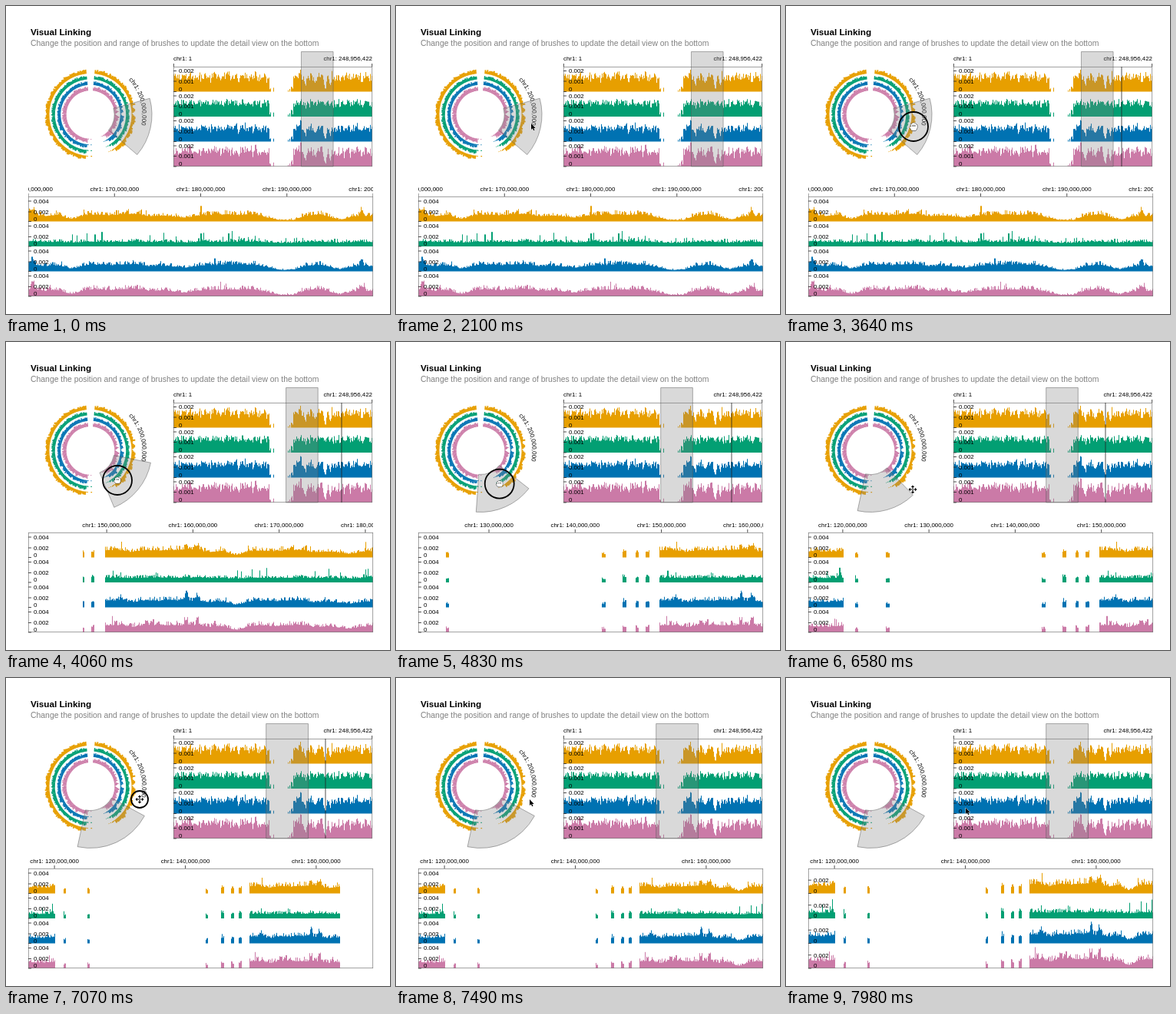
These frames come from a looping animation (500x401 px, 8 s). An HTML page with a canvas:

```html
<!DOCTYPE html>
<html lang="en">
<head>
<meta charset="utf-8">
<title>Visual Linking</title>
<style>
html, body { margin: 0; width: 100%; height: 100%; overflow: hidden; background: #fff; }
canvas { display: block; }
</style>
</head>
<body>
<canvas id="stage" width="500" height="401"></canvas>
<script>
const ctx = document.getElementById('stage').getContext('2d');
const LOOP = 8000, STEP = 70, TOTAL = 248.956422, ROW = 32.5;
const FONT = '"Liberation Sans", Arial, sans-serif';
const OVER = { x: 218, y: 79, w: 259 }, DETAIL = { x: 29, y: 248, w: 449 };
const PER_MB = OVER.w / TOTAL;
const CX = 110, CY = 141.5;
// flat: how far the common profile is levelled out, spike: size of rare tall bars
const TRACKS = [
  { color: '#E79F00', flat: 0, spike: .7, over: 2 },
  { color: '#029F73', flat: .8, spike: 1.3, over: 2.6 },
  { color: '#0072B2', flat: .1, spike: .4, over: 1.9 },
  { color: '#CB7AA7', flat: 0, spike: .8, over: 2.05 }
];

const DIPS = [[165, 1.3, 6], [178.3, 1.2, 5], [190, 2.4, 8], [196.2, 1.2, 8]]; // centre, width, depth
const PEAKS = [89.4, 159.2, 160.5, 198.65];
const ISLANDS = [121.6, 125.2, 143.3, 145.7, 147.2, 148.4];
const inGap = m => m > 120.1 && m < 149.8;

// Moves of the pointer: begin, end, then the place it arrives at
const MOVES = [
  [840, 2100, 176, 153], [2310, 2520, 158, 114], [2940, 3080, 166, 157], [3640, 4060, 145, 180],
  [4270, 5250, 127, 188], [5530, 6160, 176, 146], [6160, 6580, 165, 192], [6720, 7070, 174, 158],
  [7490, 7980, 234, 169]
];

const ramp = (t, from, to) => Math.min(1, Math.max(0, (t - from) / (to - from)));
const bell = (m, centre, width) => Math.exp(-(((m - centre) / width) ** 2));

function brushAt(t) {
  const start = 160 - 38.2 * ramp(t, 3640, 4480) - 5.8 * ramp(t, 4830, 5250);
  return [start, start + 40 + 12.7 * ramp(t, 6720, 7070)];
}

function pointerAt(t) {
  return MOVES.reduce(([x, y], [from, to, toX, toY]) => {
    const p = ramp(t, from, to);
    return [x + (toX - x) * p, y + (toY - y) * p];
  }, [260, 401]);
}

function rand(n, k) {
  const s = Math.sin(n * 12.9898 + k * 78.233) * 43758.5453;
  return s - Math.floor(s);
}

function smooth(v, k) {
  const i = Math.floor(v), p = v - i;
  return rand(i, k) * (1 - p) + rand(i + 1, k) * p;
}

function level(m, track) {
  if (inGap(m)) {
    const i = ISLANDS.findIndex(c => Math.abs(m - c) < .18);
    return i < 0 ? 0 : 4 + 6 * rand(i, 3);
  }
  let h = 9 + 4 * smooth(m / 1.5, 9);
  for (const [c, w, depth] of DIPS) h -= depth * bell(m, c, w);
  for (const c of PEAKS) h += 9 * bell(m, c, .2);
  return Math.max(2.5, h + (7 - h) * track.flat);
}

const fine = TRACKS.map((tr, k) => Array.from({ length: 2490 }, (_, i) => {
  const burst = rand(i, k + 20) > .92 ? 1 + tr.spike * rand(i, k + 30) : 1;
  return level(i / 10 + .05, tr) * (.75 + .5 * rand(i, k + 1) ** 2) * burst;
}));

const coarse = TRACKS.map((tr, k) => Array.from({ length: 249 }, (_, i) => {
  let sum = 0;
  for (let s = .1; s < 1; s += .2) sum += level(i + s, tr);
  const notch = rand(i, 50) > .88 ? .75 : 1;
  return Math.min(31.5, sum / 5 * tr.over * notch * (.72 + .38 * rand(i, k + 40)));
}));

function text(s, x, y, size = 7.9, align = 'left', color = '#000', weight = '') {
  ctx.font = `${weight} ${size}px ${FONT}`;
  ctx.textAlign = align;
  ctx.fillStyle = color;
  ctx.fillText(s, x, y);
}

function line(x1, y1, x2, y2, color = '#222', width = .8) {
  ctx.strokeStyle = color;
  ctx.lineWidth = width;
  ctx.beginPath();
  ctx.moveTo(x1, y1);
  ctx.lineTo(x2, y2);
  ctx.stroke();
}

// One bar per pixel column; height(k, x) gives the bar of row k
function rows(p, height) {
  TRACKS.forEach((tr, k) => {
    ctx.fillStyle = tr.color;
    const base = p.y + ROW * (k + 1);
    for (let x = 0; x < p.w; x++) {
      const h = height(k, x + .5);
      if (h) ctx.fillRect(p.x + x, base - h, 1, h);
    }
  });
  ctx.strokeStyle = '#777';
  ctx.lineWidth = .7;
  ctx.strokeRect(p.x + .3, p.y + .3, p.w - .6, ROW * 4 - .6);
}

// Vertical scale of every row; labels are [text, distance above the base]
function scale(p, labels) {
  for (let k = 1; k <= 4; k++) {
    const base = p.y + ROW * k;
    for (const [s, up] of labels) {
      line(p.x, base - up, p.x + 4, base - up);
      text(s, p.x + 7, base - Math.max(up, 3.5) + 2.8);
    }
  }
}

function overview() {
  rows(OVER, (k, x) => coarse[k][Math.floor(x / PER_MB)]);
  scale(OVER, [['0.002', 27], ['0.001', 13.5], ['0', 0]]);
  line(218.4, 75, 218.4, 79);
  line(476.6, 75, 476.6, 79);
  text('chr1: 1', 218, 71);
  text('chr1: 248,956,422', 477, 71, 7.9, 'right');
}

const angle = m => (264.6 - m * 1.4) * Math.PI / 180;

function wedge(r1, r2, a, b) {
  ctx.beginPath();
  ctx.arc(CX, CY, r2, a, b);
  ctx.arc(CX, CY, r1, b, a, true);
  ctx.closePath();
}

function circle() {
  coarse.forEach((bars, k) => {
    ctx.fillStyle = TRACKS[k].color;
    const r = 53.6 - k * 7.4;
    bars.forEach((h, i) => {
      if (h < .5) return;
      wedge(r, r + h * .235, angle(i + 1.3), angle(i));
      ctx.fill();
    });
  });
  const label = 'chr1: 200,000,000', r = 67.5;
  ctx.font = `7.9px ${FONT}`;
  let a = angle(200) - ctx.measureText(label).width / 2 / r;
  for (const c of label) {
    const w = ctx.measureText(c).width / r;
    ctx.save();
    ctx.translate(CX, CY);
    ctx.rotate(a + w / 2 + Math.PI / 2);
    text(c, 0, -r, 7.9, 'center');
    ctx.restore();
    a += w;
  }
}

function detail(t, start, end) {
  const w = DETAIL.w / (end - start), toX = m => DETAIL.x + (m - start) * w;
  const [readyFrom, readyTo] = brushAt(t - 140); // data arrives a little late
  const zoomed = t >= 7560;
  rows(DETAIL, (k, x) => {
    const m = start + x / w;
    if (m < readyFrom || m > readyTo) return 0;
    return Math.min(31, fine[k][Math.floor(m * 10)] * (zoomed ? 1.3 : 1));
  });
  ctx.save();
  ctx.beginPath();
  ctx.rect(DETAIL.x, 228, DETAIL.w, 21);
  ctx.clip();
  const step = end - start > 42.4 ? 20 : 10;
  for (let m = Math.ceil((start - .01) / step) * step; m <= end + .01; m += step) {
    line(toX(m), 244, toX(m), 248);
    text(`chr1: ${m},000,000`, toX(m), 241, 7.9, 'center');
  }
  ctx.restore();
  scale(DETAIL, zoomed ? [['0.002', 17.3], ['0', 0]] : [['0.004', 26.5], ['0.002', 12.5], ['0', 0]]);
  return toX;
}

function brushes(start, end) {
  const paint = () => { ctx.fill(); ctx.stroke(); };
  ctx.fillStyle = 'rgba(128,128,128,.3)';
  ctx.strokeStyle = 'rgba(90,90,90,.7)';
  ctx.lineWidth = .7;
  ctx.beginPath();
  ctx.rect(OVER.x + start * PER_MB, 59.5, (end - start) * PER_MB, 149.5);
  paint();
  wedge(31, 80, angle(end), angle(start));
  paint();
}

// Position under the pointer, held while the brush takes the mouse
function hovered(t, x, y) {
  if (t >= 840 && t < 2100 && y > DETAIL.y && y < 378) return 160 + (x - DETAIL.x) / 11.23;
  if (t >= 2450 && t < 5250) return 210.5;
  if (t >= 5250 && t < 5600) return 147.9;
  if (t >= 6090 && t < 7490) return 190.3;
  return null;
}

const ARROW = new Path2D('M0 0V8L1.8 6.3L3.2 9.2L4.5 8.6L3.2 5.9H5.7Z');
const HAND = new Path2D('M-2.5 5L-5 1Q-5.2 -.6 -3.3 .4L-3.7 -3Q-3.2 -4.6 -2.1 -3.2Q-1.6 -5.8 -.2 -4.5Q1.2 -5.6 1.8 -3.7Q3.2 -4.6 3.7 -2.8Q5 -3 4.8 -1V2L3.2 5Z');
const ARM = new Path2D('M0 -5.5L2.2 -3H.6V0H-.6V-3H-2.2Z');

function pointer(t, x, y) {
  if (t < 840) return;
  const dragging = t >= 3430 && t < 5320, resizing = t >= 6720 && t < 7490;
  const hand = t >= 3010 && t < 5670, move = t >= 6510 && t < 7490;
  ctx.save();
  ctx.translate(x, y);
  if (dragging || resizing) {
    ctx.beginPath();
    ctx.arc(0, 0, resizing ? 11 : 19, 0, 7);
    ctx.strokeStyle = '#000';
    ctx.lineWidth = 1.8;
    ctx.stroke();
  }
  ctx.strokeStyle = hand ? '#000' : '#fff';
  ctx.fillStyle = hand ? '#fff' : '#000';
  ctx.lineWidth = .9;
  if (dragging && t > 3640) ctx.scale(.85, .8);
  for (let i = 0; i < (move ? 4 : 1); i++) {
    const shape = move ? ARM : hand ? HAND : ARROW;
    ctx.stroke(shape);
    ctx.fill(shape);
    if (move) ctx.rotate(Math.PI / 2);
  }
  if (hand) for (const dx of [-1.3, .4, 2.1]) line(dx, -2.3, dx, 0, '#000', .6);
  ctx.restore();
}

function draw(now) {
  const t = Math.floor(now % LOOP / STEP) * STEP;
  const [start, end] = brushAt(t), [x, y] = pointerAt(t);
  ctx.fillStyle = '#fff';
  ctx.fillRect(0, 0, 500, 401);
  text('Visual Linking', 32, 38, 11.7, 'left', '#000', 'bold');
  text('Change the position and range of brushes to update the detail view on the bottom', 32, 52, 10.42, 'left', '#808080');
  circle();
  overview();
  const toX = detail(t, start, end);
  const m = hovered(t, x, y);
  if (m !== null) {
    const ox = OVER.x + m * PER_MB;
    line(ox, 79, ox, 209);
    if (m > start && m < end) line(toX(m), 248, toX(m), 378);
  }
  brushes(start, end);
  pointer(t, x, y);
}

const began = performance.now();
function tick() {
  draw(performance.now() - began);
  requestAnimationFrame(tick);
}
tick();
</script>
</body>
</html>
```
